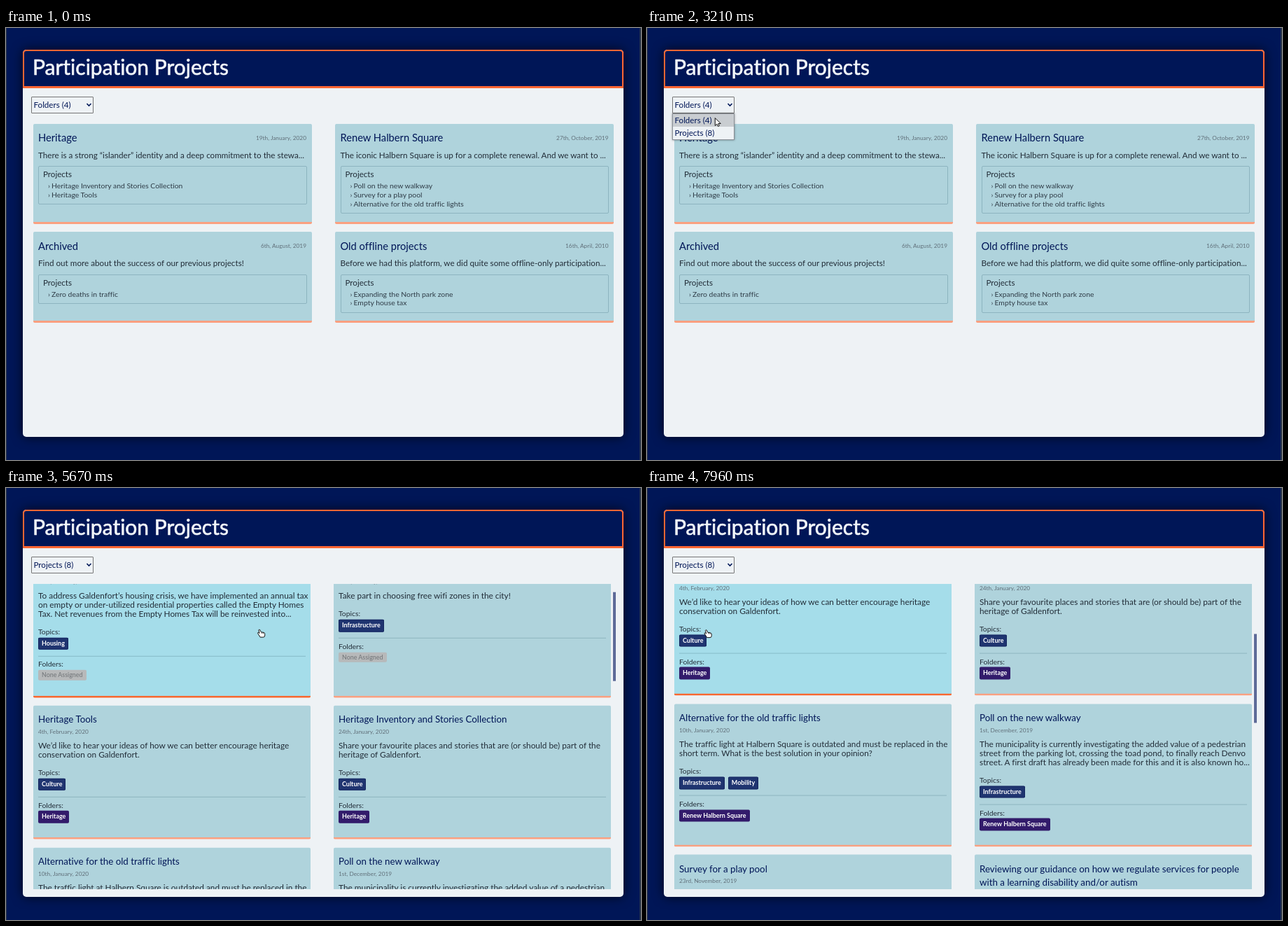
Write an HTML page that moves like this. It is 907x617 px and loops after 8000 ms.

```html
<!DOCTYPE html>
<html lang="en">
<head>
<meta charset="utf-8">
<title>Participation Projects</title>
<style>
html, body { margin: 0; width: 100%; height: 100%; overflow: hidden; background: #001657; }
body { font: 11.85px Lato, sans-serif; font-variant-ligatures: none; color: #222d38; position: relative; }
div { position: absolute; box-sizing: border-box; }
.text { white-space: pre; line-height: 20px; margin-top: -10px; }
.edge { background: #2b374c; }
.panel { background: #eef2f5; border-radius: 5px; box-shadow: 0 0 16px rgba(0, 0, 0, .75); }
.header { background: #001657; border: 2px solid #ff6633; border-bottom-width: 3px; border-radius: 5px 5px 0 0; }
.heading { font-size: 30px; color: #f3f6fa; -webkit-text-stroke: .6px #f3f6fa; }
.select { border: 1px solid #767676; border-radius: 1px; }
.option { font-size: 11.6px; color: #001657; }
.popup { background: #eef2f5; border: 1px solid #8a8f96; box-shadow: 0 0 3px rgba(0, 0, 0, .4); }
.mark { background: #c9cdd1; }
.error { font-size: 11px; }
.view { overflow: hidden; }
.card { border-radius: 2px; border-bottom: 3px solid; }
.title { font-size: 13.35px; color: #001657; }
.folders { font-size: 11.7px; }
.folders .title { font-size: 14.7px; }
.date { font-size: 8.3px; color: #61707a; }
.folders .date { right: 7.5px; }
.box { border: 1px solid rgba(70, 115, 130, .32); border-radius: 2px; }
.sub { font-size: 11.6px; }
.label, .link { font-size: 10.4px; }
.rule { background: rgba(70, 115, 130, .32); }
.tag { font-size: 8.95px; font-weight: 700; color: #fff; line-height: 16px; height: 17.5px; padding: 0 5px; border-radius: 2px; white-space: pre; }
.topic { background: #1f3470; box-shadow: inset 0 0 0 1px #14265f; }
.folder { background: #321b6b; }
.none { background: #b7b9ba; color: #75797c; font-size: 8.9px; font-weight: 500; height: 14.5px; line-height: 14.5px; }
.thumb { background: #5d6a98; }
svg { position: absolute; left: 0; top: 0; overflow: visible; }
</style>
</head>
<body>
<script>
const LOOP = 8000, TOP = 136.5;
const OPEN = 2960, CHOSEN = 3830, FAILED = 3960, LOADED = 4040;

function add(parent, cls, x, y, w, h, text = '') {
  const node = document.createElement('div');
  node.className = cls;
  node.textContent = text;
  const size = { left: x, top: y, width: w, height: h };
  for (const key in size) if (size[key] != null) node.style[key] = size[key] + 'px';
  parent.append(node);
  return node;
}
const write = (parent, cls, x, y, text) => add(parent, 'text ' + cls, x, y, null, null, text);
const show = (node, on) => { node.style.display = on ? '' : 'none'; };

// Page frame
const page = document.body;
add(page, 'edge', 0, 0, 1, 617);
add(page, 'edge', 905, 0, 2, 617);
add(page, 'panel', 24, 31, 858, 553);
add(page, 'header', 24, 31, 858, 55);
write(page, 'heading', 38, 55, 'Participation Projects');

const select = add(page, 'select', 36, 98, 89, 24);
const choice = write(select, 'option', 2.5, 10.5, '');
select.insertAdjacentHTML('beforeend',
  '<svg width="1" height="1"><path d="M78.5 9l3 3 3-3" fill="none" stroke="#001657" stroke-width="1.6"/></svg>');
const error = write(page, 'error', 36, 103, 'Error');

// Folder overview
const folderView = add(page, 'folders', 0, 0);
const cards = [], links = [];

function folderCard(x, y, h, title, date, intro, projects) {
  const node = add(folderView, 'card', x, y, 398, h);
  cards.push({ node, x, y, w: 398, h, view: 'folders' });
  write(node, 'title', 7.5, 19.5, title);
  write(node, 'date', null, 20, date);
  write(node, '', 7.5, 44, intro);
  add(node, 'box', 7.5, 60.5, 383.5, 29.5 + 12.9 * projects.length);
  write(node, 'sub', 14.5, 72.5, 'Projects');
  projects.forEach((name, i) => {
    const dy = 88.5 + 12.9 * i;
    const link = add(node, '', 21.5, dy);
    write(link, 'link', 0, 0, '›');
    write(link, 'link', 5, 0, name);
    links.push({ node: link, x: x + 21.5, y: y + dy - 6.4, w: name.length * 4.7 + 5, h: 12.9, view: 'folders' });
  });
}
folderCard(38.5, TOP, 143, 'Heritage', '19th, January, 2020',
  'There is a strong “islander” identity and a deep commitment to the stewa...',
  ['Heritage Inventory and Stories Collection', 'Heritage Tools']);
folderCard(470, TOP, 143, 'Renew Halbern Square', '27th, October, 2019',
  'The iconic Halbern Square is up for a complete renewal. And we want to ...',
  ['Poll on the new walkway', 'Survey for a play pool', 'Alternative for the old traffic lights']);
folderCard(38.5, 291, 130, 'Archived', '6th, August, 2019',
  'Find out more about the success of our previous projects!', ['Zero deaths in traffic']);
folderCard(470, 291, 130, 'Old offline projects', '16th, April, 2010',
  'Before we had this platform, we did quite some offline-only participation...',
  ['Expanding the North park zone', 'Empty house tax']);

// Project overview
const projectView = add(page, 'projects', 0, 0);
const viewport = add(projectView, 'view', 0, TOP, 866, 436.5);
const list = add(viewport, '', 0, 0);
const thumb = add(projectView, 'thumb', 867, TOP, 4, 127);

function projectCard(column, y, h, titles, date, lines, topics, folder) {
  const x = column ? 467.5 : 38.5;
  const node = add(list, 'card', x, y, 396.5, h);
  cards.push({ node, x, y: y + TOP, w: 396.5, h, view: 'projects' });
  titles.forEach((line, i) => write(node, 'title', 7.5, 19.5 + 19 * i, line));
  const shift = 19 * (titles.length - 1);
  write(node, 'date', 7.5, 37 + shift, date);
  lines.forEach((line, i) => write(node, '', 7.5, 57.5 + shift + 12.8 * i, line));
  const base = 70 + shift + 12.8 * lines.length;
  write(node, 'label', 7.5, base, 'Topics:');
  const row = add(node, '', 7.5, base + 8.7);
  row.style.cssText += 'display:flex;gap:5px';
  for (const topic of topics) add(row, 'tag topic', null, null, null, null, topic).style.position = 'static';
  add(node, 'rule', 7.5, base + 35, 381.5, 1);
  write(node, 'label', 7.5, base + 46.5, 'Folders:');
  add(node, folder ? 'tag folder' : 'tag none', 7.5, base + 55.3, null, null, folder || 'None Assigned');
}
projectCard(0, 0, 203, ['Empty Homes Tax'], '14th, February, 2020',
  ['To address Galdenfort’s housing crisis, we have implemented an annual tax',
   'on empty or under-utilized residential properties called the Empty Homes',
   'Tax. Net revenues from the Empty Homes Tax will be reinvested into...'], ['Housing']);
projectCard(1, 0, 203, ['Free wifi zones'], '10th, February, 2020',
  ['Take part in choosing free wifi zones in the city!'], ['Infrastructure']);
projectCard(0, 214, 191.5, ['Heritage Tools'], '4th, February, 2020',
  ['We’d like to hear your ideas of how we can better encourage heritage', 'conservation on Galdenfort.'],
  ['Culture'], 'Heritage');
projectCard(1, 214, 191.5, ['Heritage Inventory and Stories Collection'], '24th, January, 2020',
  ['Share your favourite places and stories that are (or should be) part of the', 'heritage of Galdenfort.'],
  ['Culture'], 'Heritage');
projectCard(0, 417.3, 204.5, ['Alternative for the old traffic lights'], '10th, January, 2020',
  ['The traffic light at Halbern Square is outdated and must be replaced in the',
   'short term. What is the best solution in your opinion?'],
  ['Infrastructure', 'Mobility'], 'Renew Halbern Square');
projectCard(1, 417.3, 204.5, ['Poll on the new walkway'], '1st, December, 2019',
  ['The municipality is currently investigating the added value of a pedestrian',
   'street from the parking lot, crossing the toad pond, to finally reach Denvo',
   'street. A first draft has already been made for this and it is also known ho...'],
  ['Infrastructure'], 'Renew Halbern Square');
projectCard(0, 632.8, 210, ['Survey for a play pool'], '23rd, November, 2019',
  ['A new municipal play pool is planned in Halbern Square this year.'], ['Culture'], 'Renew Halbern Square');
projectCard(1, 632.8, 210,
  ['Reviewing our guidance on how we regulate services for people', 'with a learning disability and/or autism'],
  '11th, October, 2019', ['Tell us what you think of the new guidance.'], ['Housing']);

// Drop-down and pointer
const popup = add(page, 'popup', 36, 122, 89, 38);
const mark = add(popup, 'mark', 0, 0, 87, 18);
write(popup, 'option', 2.5, 9, 'Folders (4)');
write(popup, 'option', 2.5, 27, 'Projects (8)');

page.insertAdjacentHTML('beforeend', `<svg width="1" height="1"><g id="pointer" fill="#fff" stroke="#111" stroke-linejoin="round">
  <path id="arrow" d="M-4-6V5l2.6-2.4L.2 6l1.8-.8L.5 2H4z"/>
  <g id="hand"><path d="M-3.6-4.6Q-3-6-1.8-5L-.2-1.7 3.4-1.2Q5.2-.8 5.2 1V3.4Q5 5.6 3 5.6H-1.4L-5-.2Q-5-1.6-3.6-1L-2.4 0Z"/>
  <path d="M.9-1.4V.6M3-1.1V.8" stroke-width=".7"/></g></g></svg>`);
const pointer = document.getElementById('pointer');
const arrow = document.getElementById('arrow');
const hand = document.getElementById('hand');

// Motion: rows of [time, value, ...]
const pointerPath = [
  [170, 340, -8], [550, 280, 100], [1000, 199, 202], [1040, 180, 206], [1210, 180, 206],
  [1600, 156, 224], [2000, 124, 243], [2210, 124, 243], [2480, 116, 185], [2750, 100, 122],
  [2960, 100, 122], [3460, 102.5, 147], [4590, 102.5, 147], [5000, 240, 180], [5380, 363.5, 204.5],
  [5460, 364, 206], [5670, 364.5, 207.5], [6250, 366.5, 211], [6750, 328, 214.5], [7000, 328, 214.5],
  [7300, 57, 221], [7460, 86, 214], [7670, 86, 214], [7960, 87, 208]
];
const scrollPath = [
  [5420, 0], [5670, 40], [5920, 86], [6090, 86], [6250, 115], [6750, 250.8], [7630, 250.8], [7960, 245.4]
];
function follow(path, t) {
  const next = path.findIndex(key => key[0] > t);
  if (next < 0) return path[path.length - 1].slice(1);
  if (next === 0) return path[0].slice(1);
  const a = path[next - 1], b = path[next], k = (t - a[0]) / (b[0] - a[0]);
  return a.slice(1).map((v, i) => v + (b[i + 1] - v) * k);
}
const viewAt = t => t < FAILED ? 'folders' : t < LOADED ? 'error' : 'projects';
const popupAt = t => t >= OPEN && t < CHOSEN;

function isOver(area, t) {
  if (viewAt(t) !== area.view || popupAt(t)) return false;
  const [x, y] = follow(pointerPath, t);
  const top = area.y - (area.view === 'projects' ? follow(scrollPath, t)[0] : 0);
  return x >= area.x && x < area.x + area.w && y - 5 >= top && y - 5 < top + area.h;
}
// Hover strength: share of the last moments spent over the area
function hover(area, t) {
  let sum = 0;
  for (let i = 0; i < 8; i++) sum += isOver(area, t - i * 18);
  return sum / 8;
}
const mix = (a, b, k) => `rgb(${a.map((v, i) => Math.round(v + (b[i] - v) * k))})`;

function draw(t) {
  const view = viewAt(t), open = popupAt(t);
  const [x, y] = follow(pointerPath, t), [scroll] = follow(scrollPath, t);

  show(folderView, view === 'folders');
  show(projectView, view === 'projects');
  show(error, view === 'error');
  show(select, view !== 'error');
  show(popup, open);
  choice.textContent = view === 'projects' ? 'Projects (8)' : 'Folders (4)';
  mark.style.top = (y > 141 ? 18 : 0) + 'px';
  list.style.transform = `translateY(${-scroll}px)`;
  thumb.style.transform = `translateY(${scroll * .2912}px)`;

  for (const card of cards) {
    if (card.view !== view) continue;
    const k = hover(card, t);
    card.node.style.backgroundColor = mix([175, 211, 220], [165, 221, 234], k);
    card.node.style.borderBottomColor = mix([250, 160, 128], [249, 103, 47], k);
  }
  for (const link of links) link.node.style.color = mix([47, 60, 71], [244, 105, 52], hover(link, t));

  const pointing = view === 'error' || cards.some(card => isOver(card, t));
  show(pointer, t >= 210);
  show(hand, pointing);
  show(arrow, !pointing);
  pointer.setAttribute('transform', `translate(${x} ${y})`);
}
function tick() {
  draw(performance.now() % LOOP);
  requestAnimationFrame(tick);
}
tick();
</script>
</body>
</html>
```
